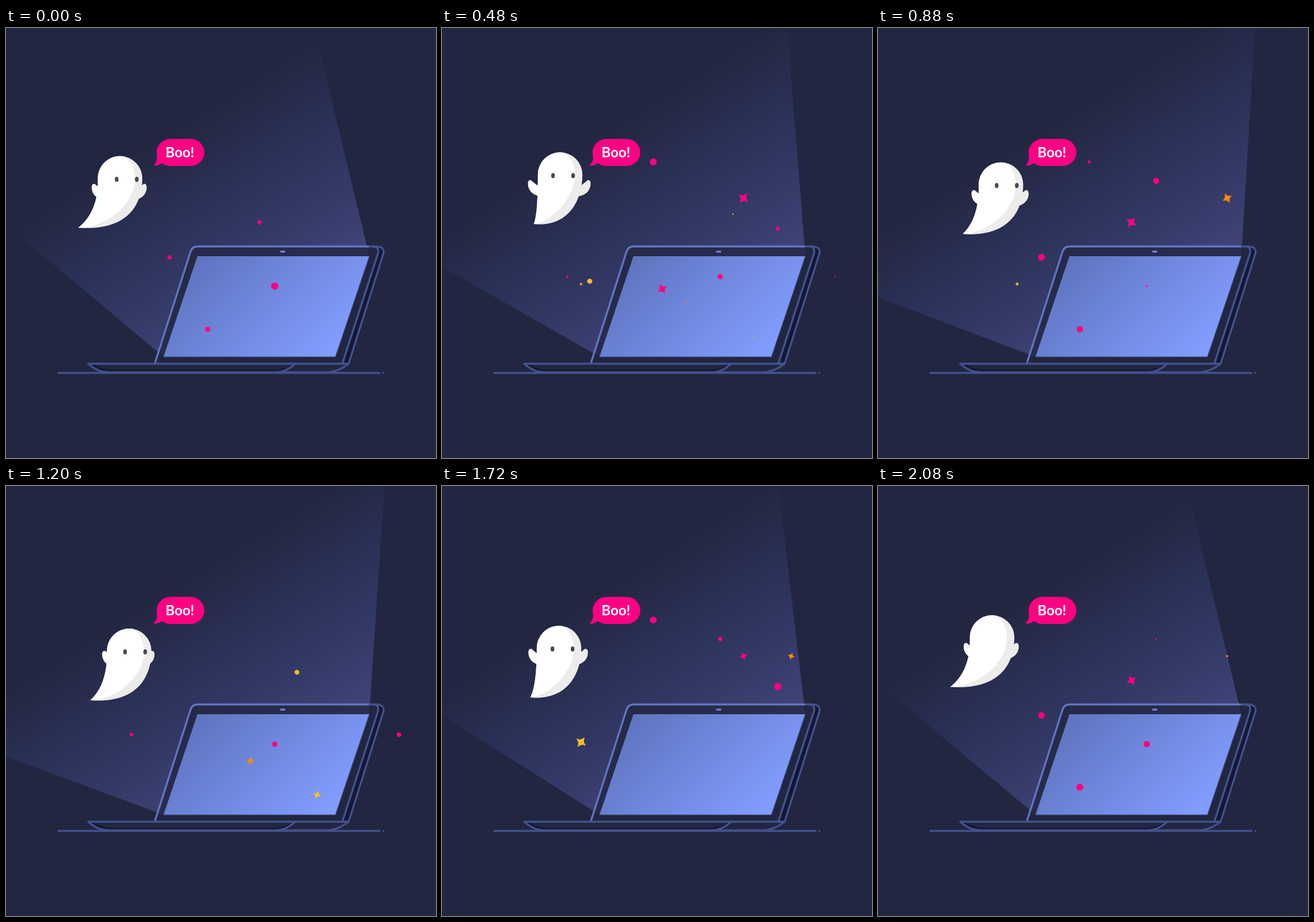
Animation, 748 px wide and 748 px high, one loop 2120 ms. Source, as an HTML page:

```html
<!DOCTYPE html>
<html lang="en">
<head>
<meta charset="utf-8">
<title>Boo</title>
<style>
  html, body { margin: 0; width: 100%; height: 100%; overflow: hidden; background: #222640; }
  svg { display: block; width: 100%; height: 100%; }
  .line { fill: none; stroke: #43528f; stroke-width: 3.3; stroke-linecap: round; stroke-linejoin: round; }
  text { font: 700 24px Lato, sans-serif; fill: #fff; }
</style>
</head>
<body>
<svg viewBox="0 0 748 748">
  <defs>
    <linearGradient id="glow" gradientUnits="userSpaceOnUse" x1="160" y1="253" x2="347" y2="549">
      <stop offset="0" stop-color="#3d427a" stop-opacity="0"/>
      <stop offset=".4" stop-color="#374178" stop-opacity=".42"/>
      <stop offset="1" stop-color="#414479" stop-opacity=".95"/>
    </linearGradient>
    <linearGradient id="screen" gradientUnits="userSpaceOnUse" x1="350" y1="390" x2="545" y2="585">
      <stop offset="0" stop-color="#6075c0"/>
      <stop offset="1" stop-color="#829dff"/>
    </linearGradient>
    <path id="arm" d="M5 48.7C1.5 48 0 51 0 55C0 66 8 75 22 77V60C15 58 10 52 5 48.7Z"/>
  </defs>

  <path id="beam" fill="url(#glow)"/>

  <path class="line" d="M637 380H645Q660 381 656 394L596 584H585L647 392Q650 380 637 380Z" style="fill:#141833"/>
  <path d="M259 583L321 389Q324 380 333 380H637Q650 380 647 392L585 584Z" fill="#222640" opacity=".75"/>
  <path class="line" d="M630 380H637Q650 380 647 392L585 584"/>
  <path class="line" d="M259 583L321 389Q324 380 333 380H630" style="stroke:#6276c4"/>
  <path d="M333 397H632L573 572H274Z" fill="url(#screen)"/>
  <path d="M632 397L573 572H274" fill="none" stroke="#43528f" stroke-width="1.2"/>
  <rect x="476.5" y="387.3" width="9.5" height="3.4" rx="1.7" fill="#6b80d6"/>

  <path d="M143 584H503Q487 598 467 598H178Q160 598 143 584Z" fill="#141833"/>
  <path d="M151 584H499Q486 594.500 467 594.500H184Q166 594.500 151 584Z" fill="#222640"/>
  <path class="line" d="M143 584H596Q577 599 555 599H178Q160 599 143 584M503 584Q487 599 467 599M91 600H650M656.300 600h.01"/>

  <g id="sparks"></g>

  <g id="ghost">
    <use id="armL" href="#arm" fill="#fff"/>
    <use id="armR" href="#arm" fill="#ececec"/>
    <path id="body" fill="#ececec"/>
    <path id="front" fill="#fff"/>
    <g id="eyes" fill="#494949">
      <ellipse rx="3.2" ry="4.5"/>
      <ellipse cx="35" rx="3.2" ry="4.5"/>
    </g>
  </g>

  <rect x="262" y="193" width="83" height="47" rx="23.500" fill="#ff0082"/>
  <path d="M262 218Q265 231 258 237Q256.500 240 260 239.500Q267 239 272 234L282 230Z" fill="#ff0082"/>
  <text x="277.500" y="224.500">Boo!</text>
</svg>
<script>
const LOOP = 2120, SPARK_LOOP = 1080;
const PINK = '#ff0082', YELLOW = '#fdb92b', ORANGE = '#ff8a00';
const $ = id => document.getElementById(id);
const set = (el, name, value) => el.setAttribute(name, value);
const clamp = v => Math.max(0, Math.min(1, v));
const wave = (t, start, period) => Math.cos(2 * Math.PI * (t - start) / period);

// Cosine interpolation through [time, value] turning points
function ease(keys, t) {
  let i = 1;
  while (i < keys.length - 1 && t > keys[i][0]) i++;
  const [t0, v0] = keys[i - 1], [t1, v1] = keys[i];
  return v0 + (v1 - v0) * (1 - Math.cos(Math.PI * clamp((t - t0) / (t1 - t0)))) / 2;
}

const STAR = 'M0-9.5Q1.6-1.6 9.5 0Q1.6 1.6 0 9.5Q-1.6 1.6-9.5 0Q-1.6-1.6 0-9.5Z';

// x, y, peak time, colour, star?, lifetime
const sparks = [
  [284.5, 399, 930, PINK], [351, 524, 960, PINK], [467.5, 449, 1085, PINK],
  [367.5, 233, 555, PINK, 0, 880], [484, 266, 790, PINK], [484, 432.5, 358, PINK],
  [584, 349, 640, PINK], [683.5, 432.5, 260, PINK], [218, 432.5, 285, PINK],
  [257, 440.5, 356, YELLOW], [506, 324, 260, YELLOW],
  [441, 338, 925, PINK, 1], [383, 454, 408, PINK, 1], [524.5, 296, 511, PINK, 1],
  [607.5, 296, 792, ORANGE, 1], [425, 478.5, 255, ORANGE, 1],
  [541, 537, 250, YELLOW, 1], [242, 445.5, 686, YELLOW, 1]
].map(([x, y, peak, color, star, life = 500]) => {
  const el = document.createElementNS('http://www.w3.org/2000/svg', star ? 'path' : 'circle');
  set(el, 'fill', color);
  if (star) {
    set(el, 'd', STAR);
    set(el, 'stroke', color);
    set(el, 'stroke-width', 1.4);
    set(el, 'stroke-linejoin', 'round');
  } else set(el, 'r', 6.3);
  $('sparks').append(el);
  return { el, x, y, start: peak - life / 2, life };
});

function drawSparks(t) {
  for (const { el, x, y, start, life } of sparks) {
    const age = ((t - start) % SPARK_LOOP + SPARK_LOOP) % SPARK_LOOP / life;
    const size = age < 1 ? Math.sin(Math.PI * age) : 0;
    set(el, 'visibility', size > .01 ? 'visible' : 'hidden');
    set(el, 'transform', `translate(${x} ${y}) rotate(${90 * age}) scale(${size})`);
  }
}

function drawBeam(t) {
  const u = 1 - Math.abs(t / (LOOP / 2) - 1);
  const p = (1 - Math.cos(Math.PI * (u + .05 * Math.sin(Math.PI * u)))) / 2;
  const a = (17.9 * p - 13.57) * Math.PI / 180;
  const b = (40 - 20.3 * p) * Math.PI / 180;
  set($('beam'), 'd', `M632 397L${632 + 700 * Math.sin(a)} ${397 - 700 * Math.cos(a)}
    L${274 - 700 * Math.cos(b)} ${572 - 700 * Math.sin(b)}L274 572Z`);
}

const REACH = [[0, 46.3], [480, 53], [1250, 44], [1780, 50.5], [LOOP, 46.3]];
const LIFT = [[0, 0], [880, 0], [1420, -15], [2060, 0], [LOOP, 0]];

function drawGhost(t) {
  const x = 206.7 - 8.3 * wave(t, 0, LOOP);
  const y = 232.5 - 18.2 * wave(t, 335, LOOP);
  set($('ghost'), 'transform', `translate(${x} ${y})`);

  const sway = wave(t, -10, LOOP / 2);
  const tip = -59 - 13.7 * sway;
  const back = `M${tip} 125C${tip * .39 - 21.8} 107.500 -39.500 80 -38.700 50V39`;
  set($('body'), 'd', `${back}A38.700 38.700 0 0 1 38.700 39C38.700 85 13.500 131 ${tip} 125Z`);
  set($('front'), 'd', `${back}A38.700 38.700 0 0 1 6 .77C20 8 26 25 26 42C24 80 -15 122 ${tip} 125Z`);

  const reach = ease(REACH, t), lift = ease(LIFT, t);
  set($('armL'), 'transform', `translate(${-reach - 3} ${lift})`);
  set($('armR'), 'transform', `translate(${reach} ${lift}) scale(-1 1)`);

  const open = clamp((2060 - t) / 80);
  set($('eyes'), 'transform', `translate(${3.3 * sway - 9.2} 40.700) scale(1 ${open})`);
}

const begin = performance.now();
function frame() {
  const t = (performance.now() - begin) % LOOP;
  drawBeam(t);
  drawSparks(t);
  drawGhost(t);
  requestAnimationFrame(frame);
}
frame();
</script>
</body>
</html>
```
